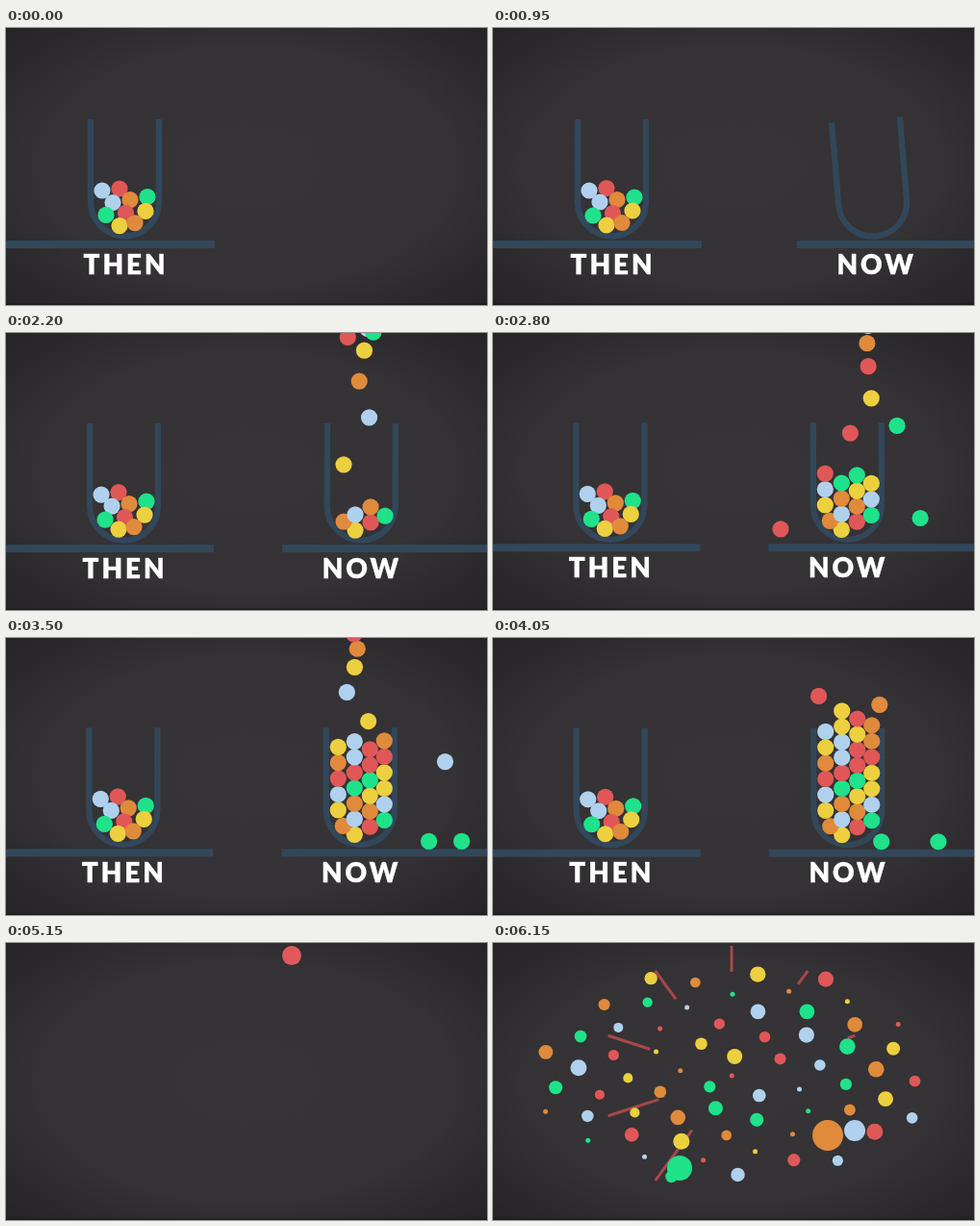
Animation of 500x288 px, one loop 6.2 s. Source, as an HTML page:

```html
<!DOCTYPE html>
<html lang="en">
<head>
<meta charset="utf-8">
<title>Then and now</title>
<style>
  html, body { margin: 0; width: 100%; height: 100%; overflow: hidden; background: #2a282b; }
  svg { display: block; width: 100vw; height: 100vh; }
  text { font: 900 27.8px Lato, "Open Sans", sans-serif; letter-spacing: 3px; fill: #fff; stroke: #fff; stroke-width: .4; }
  .jar { fill: none; stroke: #32475a; stroke-width: 6.3; }
  .shelf { fill: #32475a; }
</style>
</head>
<body>
<svg viewBox="0 0 500 288">
  <defs>
    <radialGradient id="vignette" cx="50%" cy="50%" r="72%">
      <stop offset="0" stop-color="#363436"/>
      <stop offset=".6" stop-color="#343234"/>
      <stop offset=".74" stop-color="#2e2c2e"/>
      <stop offset="1" stop-color="#252326"/>
    </radialGradient>
    <filter id="soft"><feGaussianBlur stdDeviation=".7"/></filter>
  </defs>
  <rect width="500" height="288" fill="url(#vignette)"/>
  <g id="scene">
    <rect class="shelf" x="-20" y="221" width="237" height="8"/>
    <path class="jar" d="M88 95V181A35.5 35.5 0 0 0 159 181V95"/>
    <text x="80.5" y="255.7">THEN</text>
    <g id="thenBalls"></g>
    <g id="now">
      <rect class="shelf" x="288" y="221" width="240" height="8"/>
      <path id="nowJar" class="jar" d="M334.5 95V181A35.5 35.5 0 0 0 405.5 181V95"/>
      <text x="329.7" y="255.7">NOW</text>
    </g>
    <g id="nowBalls" transform="translate(1 1)"></g>
  </g>
  <circle id="bomb" r="10" fill="#e05a5c"/>
  <g id="burst" filter="url(#soft)"></g>
  <rect y="286.5" width="500" height="1.5" fill="#1d1a20"/>
</svg>
<script>
const LOOP = 6200, R = 8.6, GRAVITY = 0.0013;
const COLORS = { r: '#e05758', o: '#e08a3c', y: '#ecd03f', g: '#1fe28a', b: '#b0d1ee' };
const $ = id => document.getElementById(id);
const clamp = v => Math.max(0, Math.min(1, v));
const mix = (a, b, u) => a + (b - a) * u;

function add(parent, tag, attrs) {
  const el = document.createElementNS('http://www.w3.org/2000/svg', tag);
  for (const name in attrs) el.setAttribute(name, attrs[name]);
  return parent.appendChild(el);
}
const ball = (parent, color, r = R) => add(parent, 'circle', { r, fill: COLORS[color] });
function place(el, x, y) {
  el.setAttribute('cx', x.toFixed(2));
  el.setAttribute('cy', y.toFixed(2));
}
const show = (el, on) => el.setAttribute('visibility', on ? 'visible' : 'hidden');

// A slightly tilted row of balls.
const row = (colors, x, y, gap) => [...colors].map((c, i) =>
  ({ el: ball($('thenBalls'), c), x: x + gap * i, y: y - 2.5 * i }));
const thenBalls = [
  ...row('br', 100, 169, 18), ...row('bog', 111, 181, 18),
  ...row('gry', 104, 195, 20.5), ...row('yo', 118, 205, 16)
];

// The pile: a column along each wall and a zigzag between, filled from the bottom up.
const column = (colors, y, gap, xAt) => [...colors].map((c, i) => ({ c, x: xAt(i), y: y - gap * i }));
const fillers = [
  ...column('oybroyb', 196, 16.4, i => i ? 346 : 351),
  ...column('gbyyroo', 190, 16.5, () => 394),
  ...column('yrbooyggrrbrbyyry', 205, 8.05, i => i % 2 ? 379 : 363)
].sort((a, b) => b.y - a.y).map((slot, i) => ({
  ...slot,
  el: ball($('nowBalls'), slot.c),
  land: 1854 + 67 * i,
  pour: 378 + 16 * Math.cos((i - 16.5) * Math.PI / 12)
}));

// Balls that tip over the rim: colour, time, sideways speed, drag.
const strays = [
  ['r', 2372, -0.08, 0], ['g', 2393, 0.118, 5e-5], ['g', 2665, 0.13, 1.05e-4],
  ['b', 3240, 0.2, 0], ['o', 4075, 0.16, 0], ['r', 4090, -0.1, 0]
].map(([c, time, speed, drag]) => ({ el: ball($('nowBalls'), c), time, speed, drag }));

const CENTER = [248, 138];
const rays = Array.from({ length: 7 }, (_, i) => ({
  el: add($('burst'), 'line', { stroke: '#a8474b' }),
  angle: (126 + 36 * i) * Math.PI / 180, inner: 70 + 9.5 * i, outer: 135
}));

let seed = 11;
const random = () => (seed = seed * 16807 % 2147483647) / 2147483647;
const sparks = Array.from({ length: 66 }, (_, i) => {
  const angle = i * 2.4, reach = Math.sqrt((i + random()) / 66);
  return {
    el: ball($('burst'), 'rgybo'[i % 5]),
    r: i % 4 ? 5 + 3.5 * random() : 2.5,
    x: CENTER[0] + 208 * reach * Math.cos(angle),
    y: CENTER[1] + 114 * reach * Math.sin(angle)
  };
});
for (const [c, x, y, r] of [['o', 348, 200, 16], ['b', 376, 195, 11], ['g', 194, 234, 13]])
  sparks.push({ el: ball($('burst'), c), x, y, r });

function drawNow(t) {
  const s = Math.max(0, t - 700);
  const slide = 225 * (1 - clamp(s / 500)) ** 3;
  const tilt = 9 * Math.exp(-s / 400) * Math.cos(s * Math.PI / 250);
  $('now').setAttribute('transform', `translate(${slide} 0)`);
  $('nowJar').setAttribute('transform', `rotate(${tilt} 370 219)`);
}

function drawFillers(t) {
  for (const { el, x, y, land, pour } of fillers) {
    const u = clamp((t - land + 350) / 350);
    show(el, u > 0);
    place(el, mix(pour, x, u * u), mix(-12, y, (u + u * u) / 2));
  }
}

function drawStray({ el, time, speed, drag }, t) {
  const s = t - time, rim = speed > 0 ? 405 : 334, top = 85, floor = 212;
  show(el, s > -290);
  if (s < 0) {
    const u = 1 + s / 290;
    return place(el, mix(370, rim, u), mix(-12, top, u * u));
  }
  const x = rim + speed * s - drag * s * s;
  const fall = Math.sqrt(2 * (floor - top) / GRAVITY), hop = 0.6 * fall;
  const b = s - fall;
  let y = floor;
  if (b < 0) y = top + GRAVITY / 2 * s * s;
  else if (b < hop) y -= GRAVITY / 2 * b * (hop - b);
  // Past the left end of the shelf nothing holds the ball.
  if (speed < 0) y += GRAVITY * Math.max(0, s + 54 / speed) ** 2;
  place(el, drag ? Math.max(404, x) : x, y);
}

function drawBomb(t) {
  show($('bomb'), t > 5040 && t < 5890);
  const u = clamp((t - 5150) / 700), e = 0.3 * u + 0.7 * u * u;
  place($('bomb'), mix(297, 248, e), mix(13, 148, e) - Math.max(0, 5150 - t) * 0.22);
}

function drawBurst(t) {
  const u = clamp((t - 5850) / 300), e = u * (2 - u);
  show($('burst'), t >= 5890);
  for (const { el, x, y, r } of sparks) {
    place(el, mix(CENTER[0], x, e), mix(CENTER[1], y, e));
    el.setAttribute('r', r * mix(0.4, 1, e));
  }
  for (const { el, angle, inner, outer } of rays) {
    [inner, outer].forEach((reach, i) => {
      el.setAttribute('x' + (i + 1), CENTER[0] + reach * e * Math.cos(angle));
      el.setAttribute('y' + (i + 1), CENTER[1] + reach * e * Math.sin(angle));
    });
    el.setAttribute('stroke-width', 3 * e);
  }
}

function draw(t) {
  const drift = clamp((t - 1450) / 1350) - 0.5 * clamp((t - 3500) / 1100);
  const drop = 300 * clamp((t - 4700) / 350) ** 2;
  $('scene').setAttribute('transform', `translate(${-1.7 * drift} ${-1.7 * drift + drop})`);
  $('scene').setAttribute('display', t < 5050 ? 'inline' : 'none');
  thenBalls.forEach(({ el, x, y }, i) =>
    place(el, x, y + 0.6 * Math.sin(t / 70 + i) * Math.exp(-t / 250)));
  drawNow(t);
  drawFillers(t);
  strays.forEach(stray => drawStray(stray, t));
  drawBomb(t);
  drawBurst(t);
}

const start = performance.now();
function tick() {
  draw((performance.now() - start) % LOOP);
  requestAnimationFrame(tick);
}
tick();
</script>
</body>
</html>
```
